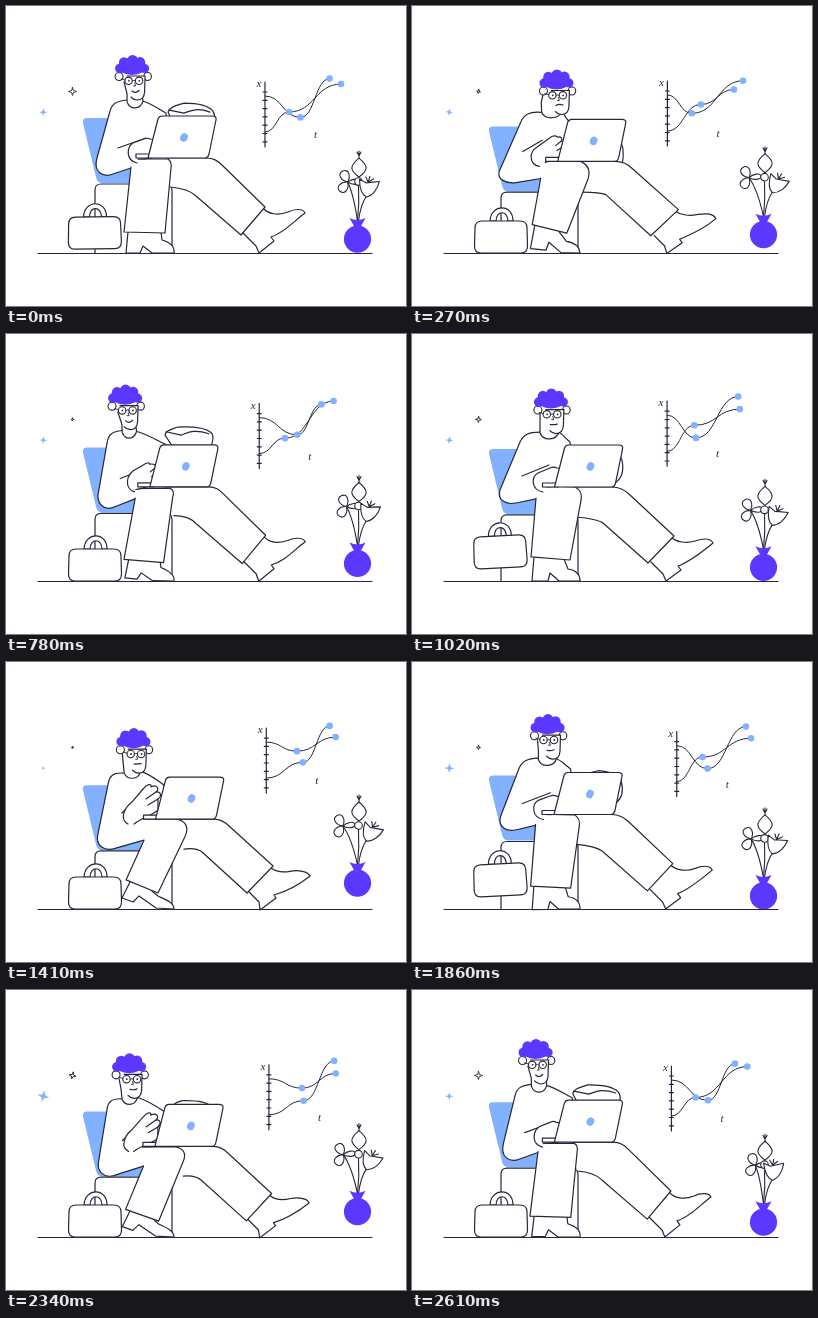
An HTML page with a canvas that plays this animation: 400 by 300 pixels, repeating every 2640 ms.

```html
<!DOCTYPE html>
<html>
<head>
<meta charset="utf-8">
<style>
html, body { margin: 0; height: 100%; overflow: hidden; background: #fff; }
canvas { display: block; }
</style>
</head>
<body>
<canvas id="stage" width="400" height="300"></canvas>
<script>
const ctx = document.getElementById('stage').getContext('2d');
const INK = '#26263a', BLUE = '#82b1ff', PURPLE = '#5b37ff', WHITE = '#fff';
const LOOP = 2640, BEAT = 880, TAU = Math.PI * 2;
let weights = [1, 0, 0];

function shape(d, fill, stroke = INK, width = 1.2) {
  const path = new Path2D(d);
  if (fill) { ctx.fillStyle = fill; ctx.fill(path); }
  if (stroke) { ctx.strokeStyle = stroke; ctx.lineWidth = width; ctx.stroke(path); }
}

function oval(x, y, rx, ry, fill, stroke, width = 1.1) {
  ctx.beginPath();
  ctx.ellipse(x, y, rx, ry, 0, 0, TAU);
  if (fill) { ctx.fillStyle = fill; ctx.fill(); }
  if (stroke) { ctx.strokeStyle = stroke; ctx.lineWidth = width; ctx.stroke(); }
}

function at(x, y, degrees, paint) {
  ctx.save();
  ctx.translate(x, y);
  ctx.rotate(degrees * TAU / 360);
  paint();
  ctx.restore();
}

// Blend of three poses: leaning back, hunched, looking over
const mix = (a, b, c) => a * weights[0] + b * weights[1] + c * weights[2];

function morph(back, hunched, over, fill) {
  const b = hunched.match(/[\d.]+/g), c = over.match(/[\d.]+/g);
  let i = 0;
  shape(back.replace(/[\d.]+/g, n => mix(n, b[i], c[i++]).toFixed(2)), fill);
}

function keyed(t, times, values) {
  let i = 1;
  while (times[i] < t) i++;
  const u = (t - times[i - 1]) / (times[i] - times[i - 1]);
  return values[i - 1] + (values[i] - values[i - 1]) * u;
}

function star(x, y, size, turn, fill, stroke) {
  if (size < 0.4) return;
  const q = size * 0.25;
  at(x, y, turn, () => shape(
    `M0 ${-size}L${q} ${-q}L${size} 0L${q} ${q}L0 ${size}L${-q} ${q}L${-size} 0L${-q} ${-q}Z`,
    fill, stroke, 0.9));
}

function stars(t, k) {
  const times = [0, 540, 1020, 1410, 1860, 2340, 2610, LOOP];
  star(37.3, 106.2, keyed(t, times, [4, 3.4, 4, 2, 4.8, 6, 4, 4]), 18 * k, BLUE, null);
  star(66.5, 85.5, keyed(t, times, [4, 0, 3, 1, 2, 3.4, 4, 4]), 18 * k, WHITE, INK);
}

function chart(t, angle) {
  const turn = t / LOOP * TAU;
  const orbit = (x, y, deg) => {
    const a = angle + deg * TAU / 360;
    return [x + 7 * Math.cos(a), y + 7 * Math.sin(a)];
  };
  at(259 - 6 * Math.sin(turn), 71 + 5 * Math.cos(turn), 0, () => {
    shape('M0 0V65', null);
    for (let y = 10; y < 60; y += 8.3) shape(`M-2 ${y}H2`, null);
    const dots = [];
    for (const [y0, deg] of [[14, 50], [50, 180]]) {
      const [x, y] = orbit(31, 30, deg), [ex, ey] = orbit(69, 2, deg + 180);
      const m = (x + ex) / 2;
      shape(`M0 ${y0}C${x / 2} ${y0} ${x / 2} ${y} ${x} ${y}C${m} ${y} ${m} ${ey} ${ex} ${ey}`, null, INK, 1);
      dots.push([x, y], [ex, ey]);
    }
    for (const [x, y] of dots) oval(x, y, 3.3, 3.3, BLUE);
    ctx.fillStyle = INK;
    ctx.font = 'italic 11px "Liberation Serif", serif';
    ctx.fillText('x', -8.5, 5);
    ctx.fillText('t', 49, 56);
  });
}

function plant(angle) {
  const spread = (0.5 - 0.5 * Math.cos(angle + 0.21)) ** 0.3;
  const line = (d, fill) => shape(d, fill, INK, 1.1);
  at(351.5, 227.5 + 6.5 * Math.cos(angle - 0.55), 0, () => {
    const x = -8 - 7 * spread;
    line(`M0 -18Q${x * 0.4} -45 ${x} -57`);
    line('M0 -18Q2 -36 1 -53');
    line('M1 -18Q3 -34 9 -43');
    at(x, -57, -8 * spread, () => {
      for (const [deg, width] of [[-22, 5.5], [90, 3], [222, 5.5]]) {
        at(0, 0, deg, () => line(`M0 0C${-width} -4 ${-width - 1} -12 0 -12C${width + 1} -12 ${width} -4 0 0Z`, WHITE));
      }
    });
    oval(1, -57.5, 3.8, 3.8, WHITE, INK, 1.1);
    line('M1.5 -81C-8 -73 -8 -69 1.5 -62C11 -69 11 -73 1.5 -81Z', WHITE);
    line('M1.5 -81V-88M1.5 -83L-.5 -87M1.5 -83L3.5 -87');
    at(9, -42, 25 * spread, () => {
      line('M0 -15L1 -21M0 -15L-3 -20M0 -15L5 -19');
      line('M0 0C-6 -2 -8 -9 -9 -17L-2 -14L2 -15L11 -17C10 -9 6 -2 0 0Z', WHITE);
    });
    shape('M-8 -21Q0 -17 8 -21L3 -12H-3Z', PURPLE, null);
    oval(0, 0, 13.6, 13.6, PURPLE);
  });
}

function chair(k) {
  const y = 178 + 12 * k;
  at(0, 12.5 * k, 0, () => shape('M81 112H120L138 177H97Q91 177 90 171L77 117Q76 112 81 112Z', BLUE, null));
  shape(`M89 247V${y + 6}Q89 ${y} 95 ${y}H160Q166 ${y} 166 ${y + 6}V247`, null);
}

function bag(phase) {
  const q = ((phase + 440) % BEAT - 560) / 143;
  const hop = Math.max(0, 13.4 * (1 - q * q));
  at(89, 247 - hop, -hop * 0.22, () => {
    shape('M-11 -32C-10 -49.5 12 -49.5 12 -32H7C6 -43 -4 -43 -5 -32Z', WHITE);
    shape('M-19 -32H19Q26 -32 26 -25L26.5 -7Q26.5 0 20 0H-20Q-26.5 0 -26.5 -7L-26 -25Q-26 -32 -19 -32Z', WHITE);
  });
}

function legs() {
  morph('M237 227L250 240L253 247L268 235L265 231C278 227 288 215 299 207C297 202 288 203 282 206C272 210 262 208 257 202',
        'M243 230L253 240L254 248L270 236L268 233C282 229 294 222 304 214C302 209 292 208 285 209C276 211 269 209 265 206',
        'M239 228L251 240L254 247L269 236L266 232C279 227 291 217 301 209C298 203 289 205 283 207C274 210 264 208 259 203', WHITE);
  morph('M160 152L200 152C208 152 212 155 217 160L259 201L235 229L190 190C184 184 176 182 164 181',
        'M170 157L208 157C214 157 218 159 223 164L267 204L241 231L196 190C192 187 186 186 178 187',
        'M160 153L200 153C208 153 213 156 218 161L262 202L236 229L191 189C185 185 175 184 164 183', WHITE);
  morph('M122 226L120 247L134 247L137 240L146 247L168 247C169 240 163 236 156 234L155 226',
        'M124 220L116 236L127 240L133 234L150 246L168 247C168 240 158 237 152 234L146 229',
        'M122 223L120 247L136 247L138 239L147 247L168 247C168 239 163 236 156 235L152 225', WHITE);
  morph('M128 153L162 153C165 155 166 157 165 162L159 227L118 226L125 161',
        'M137 157L168 157C180 158 183 165 179 174L152 231L120 218L138 178',
        'M128 152L163 153C169 156 170 160 169 166L158 226L119 223L124 164', WHITE);
}

function torso() {
  morph('M121 94C110 95 106 98 104 105L91 152C87 166 97 172 107 168L128 161L162 157L160 107C152 103 145 97 136 95',
        'M118 111C107 110 103 114 102 122L92 172C89 184 99 190 110 186L138 178L160 157L158 123C150 117 143 112 134 109',
        'M128 98C116 98 111 101 108 108L88 156C85 166 94 171 104 169L128 164L164 157L158 108C152 103 150 99 146 98', WHITE);
}

function farArm() {
  morph('M162 106C164 100 172 99 178 97C190 97 202 99 207 105C210 110 209 118 204 124L170 124Z',
        'M168 126C170 119 176 118 180 117C190 117 202 118 206 124C208 131 206 138 202 142L172 142Z',
        'M170 124C176 116 184 115 190 114C200 115 207 118 210 126C212 136 211 143 204 148L172 146Z', WHITE);
  morph('M163 104L178 107C184 105 190 101 204 106',
        'M170 126L180 128C186 126 192 124 202 128',
        'M172 126L184 128C190 126 196 124 205 128');
}

function nearHand() {
  morph('M112 142L140 132', 'M116 151L126 141', 'M110 142L137 131');
  morph('M131 157C119 154 121 141 127 137L138 133C140 132 143 132 144 133C147 133 149 134 149 136C150 137 150 139 150 141L148 150C146 152 140 153 132 153',
        'M122 162C114 158 117 147 126 140L137 127C141 122 146 121 145 125C151 122 154 127 150 130C155 129 156 134 152 137L152 148C148 153 138 154 128 162',
        'M131 158C119 156 119 143 126 139L138 134C140 133 143 133 145 134C147 134 149 135 149 137C150 138 150 140 150 142L148 150C146 152 140 153 134 153', WHITE);
  morph('M149 136L146 139M150 141L147 143',
        'M150 130L140 137M152 137L142 143',
        'M149 137L146 140M150 142L147 144');
}

function laptop() {
  at(mix(0, 7.5, 0.5), mix(0, 5, 1), 0, () => {
    shape('M130 148H146V152H130Z', WHITE);
    shape('M156 110H206Q211 110 210 114L203 148Q202 152 199 152H142L152 113Q153 110 156 110Z', WHITE);
    at(178, 131.5, 25, () => oval(0, 0, 3.7, 4.4, BLUE));
  });
}

function head() {
  morph('M118 76L121 88L121 96C124 104 134 104 137 95L136 90',
        'M116 91L117 101L118 111C121 118 132 118 134 110L134 104',
        'M128 80L128 90L128 99C131 107 144 107 147 98L146 95', WHITE);
  at(mix(0, 1, 12.8), mix(0, 17, 5.5), 0, () => {
    oval(141.5, 70.5, 3.8, 4, WHITE, INK);
    shape('M121 70H139L138.5 86Q138 94 131 94Q127 93.5 125 91', WHITE);
    oval(113, 70.5, 4, 4, WHITE, INK);
    at(mix(0, 0.8, -0.6), 0, 0, () => {
      for (const x of [122.5, 133]) {
        oval(x, 74.8, 3.7, 3.7, WHITE, INK);
        oval(x + 0.3, 74.8, 0.9, 0.9, INK);
      }
      shape('M126.2 74.8Q127.8 73.6 129.3 74.8M118.8 74L115 73M128.5 77L129.5 80H127.5', null, INK, 0.9);
      const smile = mix(3, 0, 0.3);
      shape(`M126 85Q129.5 ${85 + smile} 133 84.5`, null);
    });
    oval(126, 60.5, 14, 8.5, PURPLE);
    for (const [x, y, r] of [[113.8, 62.5, 4.8], [118, 56.5, 5.2], [126.5, 54.3, 5.4], [134, 56.3, 5.2], [138.5, 62.5, 4.6]]) {
      oval(x, y, r, r, PURPLE);
    }
  });
}

function frame(now) {
  const t = now % LOOP, phase = t % BEAT, angle = phase / BEAT * TAU;
  const k = (1 - Math.cos(angle)) / 2, s = Math.sin(angle);
  // Weights that reach each pose at its own point of the beat
  const hunched = (k * 0.841 - s * 0.23) / 0.892;
  const over = (s * 0.889 + k * 0.628) / 0.892;
  weights = [1 - hunched - over, hunched, over];

  ctx.fillStyle = WHITE;
  ctx.fillRect(0, 0, 400, 300);
  ctx.lineJoin = ctx.lineCap = 'round';
  stars(t, k);
  chart(t, angle);
  plant(angle);
  chair(k);
  farArm();
  torso();
  legs();
  head();
  nearHand();
  laptop();
  bag(phase);
  shape('M32 247.5H366', null);
  requestAnimationFrame(() => frame(performance.now()));
}
frame(0);
</script>
</body>
</html>
```
